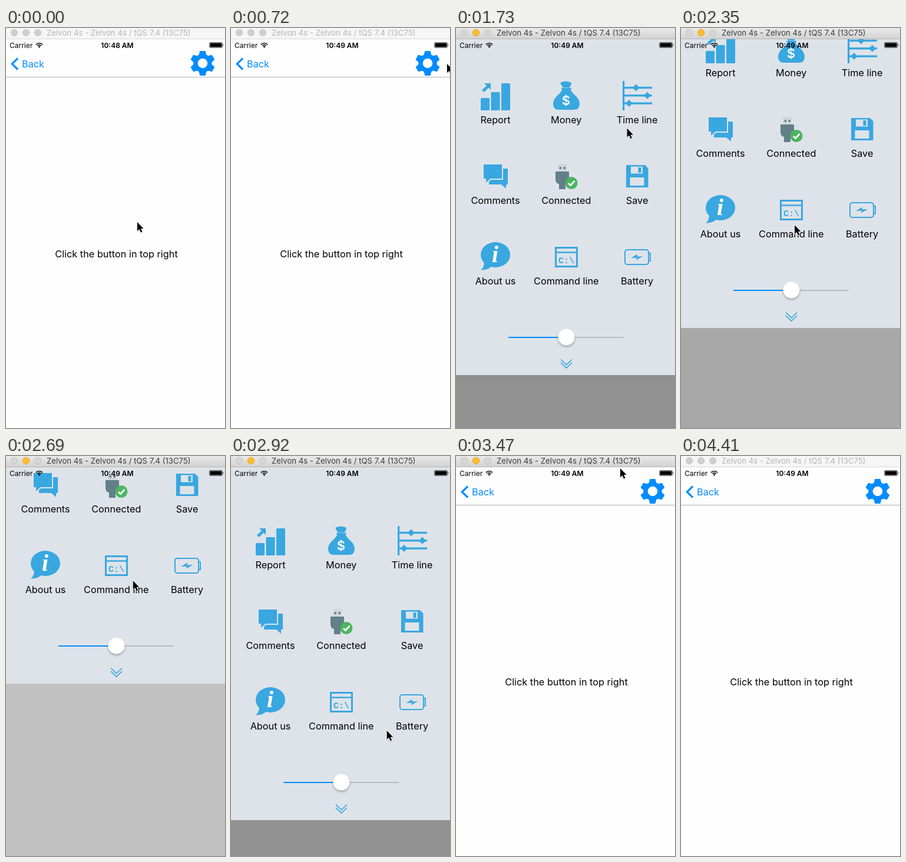
Animation, 372 px wide and 680 px high, one loop 4.45 s. Source, as an HTML page:

```html
<!DOCTYPE html>
<html lang="en">
<head>
<meta charset="utf-8">
<title>Pull-down menu</title>
<style>
  html, body { margin: 0; width: 100%; height: 100%; overflow: hidden; background: #fefefe; }
  svg { display: block; width: 372px; height: 680px; }
  text { font-family: Inter, Roboto, sans-serif; font-size: 16.3px; white-space: pre; }
  .mid { text-anchor: middle; }
  .small { font-size: 12px; }
  .title { font-size: 13.2px; }
  .ico { fill: #39a7e0; }
  .line { fill: none; stroke: #39a7e0; }
  .bg { fill: #dee3e9; }
  .ui { fill: #038cff; }
  .uiline { fill: none; stroke: #038cff; }
</style>
</head>
<body>
<svg viewBox="0 0 372 680">
  <defs>
    <linearGradient id="chrome" x2="0" y2="1">
      <stop offset="0" stop-color="#e9e9e9"/><stop offset="1" stop-color="#d3d3d3"/>
    </linearGradient>
    <filter id="soft" x="-50%" y="-50%" width="200%" height="200%">
      <feGaussianBlur stdDeviation="2.2"/>
    </filter>
    <filter id="faint" x="-50%" y="-50%" width="200%" height="200%">
      <feGaussianBlur stdDeviation="0.9"/>
    </filter>
    <path id="arrow" d="M1 1V16L4.500 13L7 18.500L9.500 17.500L7 12H11.500Z"/>
  </defs>

  <g id="page">
    <rect y="83" width="372" height="1" fill="#b2b2b2"/>
    <path class="uiline" d="M20 51.500L10.300 61L20 70.500" stroke-width="3.200"/>
    <text class="ui" x="27" y="67">Back</text>
    <g id="gear" class="ui" transform="translate(334 60)">
      <circle class="uiline" r="12" stroke-width="7.400"/>
    </g>
    <text class="mid" x="187.500" y="390">Click the button in top right</text>
  </g>

  <rect id="dim" y="19" width="372" height="661"/>

  <g id="sheet">
    <rect class="bg" width="372" height="619"/>
    <g id="labels"></g>

    <g id="report" class="ico">
      <path d="M48 123H59V134L55.500 130.500L47.500 138L44 134.500L52 127Z"/>
    </g>

    <g class="ico">
      <path d="M177 122Q187 117 196 122Q196 127 192 130H182Q179 127 177 122Z"/>
      <rect x="179" y="130.500" width="17" height="3" rx="1.500"/>
      <path d="M181 133H194Q197 139 204 145Q210 151 210 158Q210 168 200 168H175Q165 168 165 158Q165 151 171 145Q178 139 181 133Z"/>
      <text class="mid" x="187" y="160" fill="#fff" style="font-size:22px;font-weight:600">$</text>
    </g>

    <g id="lanes" class="ico">
      <rect x="283" y="119" width="3.200" height="50"/>
    </g>

    <g class="ico">
      <path d="M56 268H88V295H85V302L77 295H56Z"/>
      <path d="M46 260H79V286H59L50 294V286H46Z" stroke="#dee3e9" stroke-width="2"/>
    </g>

    <g>
      <rect x="173" y="260" width="15" height="14" fill="#d3d7da"/>
      <path d="M175.500 267h3.500M182.500 267h3.500" stroke="#5f7d89" stroke-width="3.500"/>
      <path d="M169 273H192V286Q192 293 186 294V303H175V294Q169 293 169 286Z" fill="#627f8a"/>
      <circle cx="196" cy="292.500" r="10.500" fill="#4db560"/>
      <path d="M191 293L194.500 296.500L201.500 289" fill="none" stroke="#fff" stroke-width="2.800"/>
    </g>

    <g class="ico">
      <path d="M289 262H321L326.500 267.500V300H289Z"/>
      <rect class="bg" x="297" y="264.500" width="20" height="12"/>
      <rect x="309.500" y="266" width="5" height="9"/>
      <rect class="bg" x="295.500" y="283" width="24" height="14"/>
    </g>

    <g class="ico">
      <ellipse cx="67" cy="414.500" rx="25" ry="21.500"/>
      <path d="M48 426Q48 436 42 440.500Q54 441 62 433Z"/>
      <text class="mid" x="66.500" y="427" fill="#fff"
        style="font:italic bold 41px 'Liberation Serif',serif">i</text>
    </g>

    <g>
      <rect class="line" x="169.500" y="402.500" width="36" height="32" stroke-width="3"/>
      <path class="line" d="M169 410.500H206" stroke-width="2.500"/>
      <text class="ico mid" x="187.500" y="429"
        style="font:bold 15px 'Liberation Mono',monospace">C:\</text>
    </g>

    <g>
      <rect class="line" x="287" y="406" width="40" height="25" rx="4" stroke-width="2"/>
      <path class="line" d="M328 412H330V425H328" stroke-width="2"/>
      <path class="ico" d="M297 420L308 413.500L307.500 417.500L317.500 417L306 423.500L307 419.500Z"/>
    </g>

    <rect x="187" y="554" width="98" height="2" fill="#b8bbbf"/>
    <rect class="ui" x="89" y="554" width="98" height="2"/>
    <circle cx="187.500" cy="557" r="13.500" opacity=".32" filter="url(#soft)"/>
    <circle cx="187.500" cy="554.500" r="14" fill="#fff"/>
    <path class="line" d="M178 592.500l9.500 9l9.500 -9m-19 5.500l9.500 9l9.500 -9" stroke-width="1.700"/>
  </g>

  <!-- status bar -->
  <text class="small" x="6" y="33.500">Carrier</text>
  <g transform="translate(56.500 33.700)">
    <path d="M-5.600 -5.600A7.900 7.900 0 0 1 5.600 -5.600M-3.400 -3.400A4.800 4.800 0 0 1 3.400 -3.400"
      fill="none" stroke="#000" stroke-width="1.600"/>
    <path d="M0 0L-2 -2A2.800 2.800 0 0 1 2 -2Z"/>
  </g>
  <text id="clock" class="small mid" x="189" y="33.500" font-weight="600"></text>
  <rect x="345.500" y="24.500" width="22" height="9" rx="1.500" fill="none" stroke="#000" stroke-opacity=".55"/>
  <rect x="346.500" y="25.500" width="20" height="7" rx=".5"/>
  <path d="M368.500 27.300Q370.500 29 368.500 30.700Z"/>

  <!-- window title -->
  <rect id="bar" width="372" height="18"/>
  <rect id="rim" y="18" width="372" height="1"/>
  <g id="lights"></g>
  <text id="title" class="title" x="69" y="13">Zelvon 4s - Zelvon 4s / tQS 7.4 (13C75)</text>

  <g id="cursor">
    <use href="#arrow" y="1.200" opacity=".4" filter="url(#faint)"/>
    <use href="#arrow" stroke="#fff" stroke-width="1.800" stroke-linejoin="round"/>
    <use href="#arrow"/>
  </g>
</svg>

<script>
const LOOP = 4450, CLOSED = -600;
const $ = id => document.getElementById(id);
const set = (el, attrs) => { for (const k in attrs) el.setAttribute(k, attrs[k]); };

function add(parent, tag, attrs, text = '') {
  const el = document.createElementNS('http://www.w3.org/2000/svg', tag);
  set(el, attrs);
  el.textContent = text;
  return parent.appendChild(el);
}

for (let i = 0; i < 6; i++) {
  add($('gear'), 'path', {
    d: 'M-5.7 -14L-4.2 -20.3H4.2L5.7 -14Z', transform: `rotate(${i * 60})`,
    stroke: '#038cff', 'stroke-width': 1.2, 'stroke-linejoin': 'round'
  });
}

['Report', 'Money', 'Time line', 'Comments', 'Connected', 'Save', 'About us', 'Command line', 'Battery']
  .forEach((name, i) => add($('labels'), 'text',
    { class: 'mid', x: 67 + (i % 3) * 120.3, y: 191 + Math.floor(i / 3) * 137 }, name));

[21, 31, 46].forEach((height, i) => add($('report'), 'rect',
  { x: 42 + i * 17.5, y: 169 - height, width: 15, height, rx: 1.5 }));

[306, 325, 294].forEach((x, i) => {
  const y = 130.5 + i * 13.3;
  add($('lanes'), 'rect', { x: 286, y: y - 1.7, width: 47, height: 3.4 });
  add($('lanes'), 'path', { d: `M${x - 6} ${y}l6 -6l6 6l-6 6z` });
});

const lights = [14, 34, 54].map(cx => add($('lights'), 'circle', { cx, cy: 8, r: 5.8, 'stroke-width': 0.8 }));

// Pointer stops: [time, x, y], eased in between
const stops = [
  [270, 222, 329], [718, 366, 60], [1020, 328, 64], [1420, 328, 64], [2300, 190, 443],
  [2342, 192, 334], [2576, 206, 165], [3060, 283, 566], [3200, 283, 566],
  [3462, 278, 20], [3760, 278, 614], [4030, 325, 682]
];

function pointer(t) {
  const i = stops.findIndex(s => s[0] > t);
  if (i < 1) return stops.at(i).slice(1);
  const [a, x, y] = stops[i - 1], [b, u, v] = stops[i];
  const p = (t - a) / (b - a), k = p * p * (3 - 2 * p);
  return [x + (u - x) * k, y + (v - y) * k];
}

// Eased opening, then two drags that follow the pointer
function offset(t, y) {
  if (t < 1814) return CLOSED * (1 + Math.cos(Math.PI * (t - 1185) / 629)) / 2;
  if (t < 2300) return 0;
  return Math.max(CLOSED, Math.min(0, y - (t < 3200 ? 443 : 566)));
}

const held = ms => 326 + 56 * Math.floor((ms - 326) / 56);

function render(ms) {
  const t = held(ms);
  const [x, y] = pointer(t);
  const open = ms >= 1250 && ms < 3470;
  const active = ms >= 1250 && ms < 4410;
  const off = open ? Math.round(offset(t, y)) : CLOSED;
  const shade = t < 2300 ? 1 : Math.max(0, 1 + off / 520);

  set($('cursor'), { transform: `translate(${x} ${y})` });
  set($('page'), { visibility: open ? 'hidden' : 'visible' });
  set($('sheet'), { transform: `translate(0 ${off})`, visibility: open ? 'visible' : 'hidden' });
  set($('dim'), { opacity: open ? 0.432 * shade : 0 });

  $('clock').textContent = ms < 330 ? '10:48 AM' : '10:49 AM';
  set($('bar'), { fill: active ? 'url(#chrome)' : '#f6f6f6' });
  set($('rim'), { fill: active ? '#b4b4b4' : '#d6d6d6' });
  set($('title'), { fill: active ? '#3c3c3c' : '#b6b6b6' });
  for (const c of lights) set(c, active ? { fill: '#d6d6d6', stroke: '#bdbdbd' } : { fill: '#cecece', stroke: '#c8c8c8' });
  if (active) set(lights[1], { fill: '#fdbc2f', stroke: '#dfa02a' });
}

const start = performance.now();
function frame() {
  render((performance.now() - start) % LOOP);
  requestAnimationFrame(frame);
}
frame();
</script>
</body>
</html>
```
